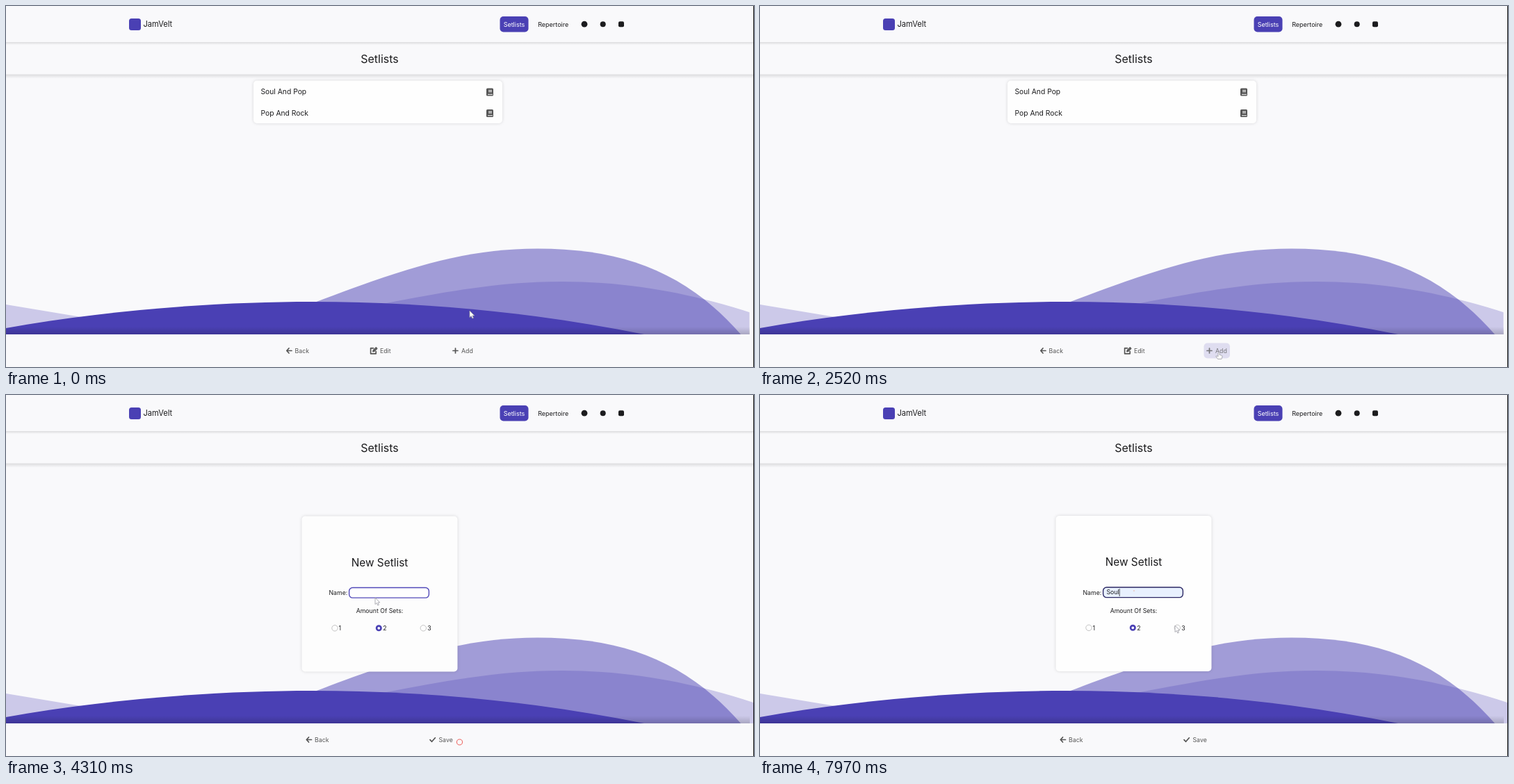
An HTML page that plays this animation: 1076x520 px, repeating every 8000 ms.

```html
<!DOCTYPE html>
<html lang="en">
<head>
<meta charset="utf-8">
<title>Setlists</title>
<style>
  html, body { margin: 0; width: 100%; height: 100%; overflow: hidden; background: #f9f9fb; }
  svg { display: block; width: 1076px; height: 520px; font: 9px Inter, sans-serif; fill: #1c1c1e; }
  .brand { fill: #4a40b4; }
  .bar { fill: #f9f9fb; }
  .panel { fill: #fefefe; filter: drop-shadow(0 0 2px rgba(0, 0, 0, .14)); }
  .list { font-size: 10.3px; }
  .small { font-size: 8.75px; }
  .mid { text-anchor: middle; }
  .tools { fill: #555; font-size: 8.75px; }
  .line { fill: none; stroke: #555; stroke-width: 1.7; stroke-linecap: round; stroke-linejoin: round; }
  .pointer { fill: #fff; stroke: #9a9aa2; stroke-width: .8; stroke-linejoin: round; }
</style>
</head>
<body>
<svg viewBox="0 0 1076 520">
  <defs>
    <linearGradient id="down" x2="0" y2="1">
      <stop stop-opacity=".12"/><stop offset="1" stop-opacity="0"/>
    </linearGradient>
    <linearGradient id="up" x2="0" y2="1">
      <stop stop-opacity="0"/><stop offset="1" stop-opacity=".17"/>
    </linearGradient>
    <g id="book">
      <rect width="10" height="11" rx="1.5" fill="#555"/>
      <path d="M3 3H8M3 5H8M2 8.8H9" stroke="#fefefe"/>
    </g>
    <g id="back">
      <path class="line" d="M407 493L403.8 496.5L407 500M404 496.5H411"/>
      <text x="415.5" y="496.5" dy=".36em">Back</text>
    </g>
  </defs>

  <g class="brand">
    <path d="M0 430L105 447.5C250 475 400 470 545 428.5C640 410 715 397 800 397C900 397 990 415 1075 443V473H0Z" opacity=".26"/>
    <path d="M400 444C560 382 650 349.5 765 349.5C890 349.5 980 385 1057 473H400Z" opacity=".5"/>
    <path d="M0 464C150 437 310 426 440 426C600 426 760 441 918 473H0Z"/>
  </g>

  <g id="listPage">
    <rect class="bar" x="1069.5" y="410" width="6" height="63"/>
    <rect class="panel" x="356" y="107.5" width="358" height="61.5" rx="5"/>
    <g class="list">
      <text x="366.5" y="123.5" dy=".36em">Soul And Pop</text>
      <text x="366.5" y="154" dy=".36em">Pop And Rock</text>
    </g>
    <use href="#book" x="691" y="118.5"/>
    <use href="#book" x="691" y="149"/>
  </g>

  <g id="form">
    <rect class="panel" x="425.5" y="174" width="224" height="224" rx="5"/>
    <text class="mid" x="537.5" y="240.5" dy=".36em" font-size="15.4">New Setlist</text>
    <g class="small">
      <text x="464.5" y="284.5" dy=".36em">Name:</text>
      <rect id="field" x="493.6" y="277" width="114.8" height="14.6" rx="5" stroke-width="1.4"/>
      <text id="typed" x="498.5" y="284.3" dy=".36em"></text>
      <path id="caret" d="M0 279V290" stroke="#222" stroke-width=".8"/>
      <text class="mid" x="537.5" y="310.5" dy=".36em">Amount Of Sets:</text>
      <g fill="#fff" stroke="#bbb" stroke-width=".9">
        <circle cx="473" cy="335.3" r="4.2"/>
        <circle cx="600.3" cy="335.3" r="4.2"/>
        <circle cx="536.3" cy="335.3" r="3.2" stroke="#4a40b4" stroke-width="2.7"/>
      </g>
      <text x="478.5" y="335.5" dy=".36em">1</text>
      <text x="542.2" y="335.5" dy=".36em">2</text>
      <text x="606.3" y="335.5" dy=".36em">3</text>
    </g>
  </g>

  <rect class="bar" width="1076" height="99"/>
  <rect y="52" width="1075" height="4" fill="url(#down)"/>
  <rect y="98.5" width="1075" height="6" fill="url(#down)"/>
  <rect class="brand" x="177" y="18" width="17" height="17" rx="3.5"/>
  <text x="197.5" y="26.3" dy=".36em" font-size="11.1">JamVelt</text>
  <rect class="brand" x="710.5" y="15" width="41" height="22.5" rx="5"/>
  <text class="mid" x="731" y="26.3" dy=".36em" fill="#fff">Setlists</text>
  <text class="mid" x="787.2" y="26.3" dy=".36em">Repertoire</text>
  <circle cx="832" cy="26.2" r="4.4"/>
  <circle cx="858.7" cy="26.2" r="4"/>
  <rect x="881" y="22.2" width="8" height="8" rx="2"/>
  <text class="mid" x="537.5" y="76" dy=".36em" font-size="16">Setlists</text>

  <rect y="462" width="1070" height="11" fill="url(#up)"/>
  <rect class="bar" y="473" width="1076" height="47"/>
  <g id="listTools" class="tools">
    <use href="#back"/>
    <path class="line" stroke-width="1.4" d="M528.5 492.8H524.6V500.8H532.2V497.5M528 497.8L528.5 495.8L532.3 492L533.6 493.3L529.8 497.2Z"/>
    <text x="538" y="496.5" dy=".36em">Edit</text>
    <rect id="hover" x="638.5" y="485.5" width="37.5" height="22" rx="5" fill="#dfddf0"/>
    <g id="add">
      <path class="line" d="M643 496.5H650M646.5 493V500"/>
      <text x="655" y="496.5" dy=".36em">Add</text>
    </g>
  </g>
  <g id="formTools" class="tools">
    <use href="#back" x="28.5"/>
    <path class="line" d="M610 496.7L612.6 499.3L617.4 493.8"/>
    <text x="622.5" y="496.5" dy=".36em">Save</text>
  </g>

  <path d="M1075.5 0V520" stroke="#111"/>
  <circle id="ring"/>
  <g id="cursor" class="pointer">
    <path id="arrow" d="M0 0V9.5L2.2 7.5L3.8 11L5.4 10.3L3.9 7H6.8Z"/>
    <path id="hand" d="M-1 0Q0-1 1 0V3.5L4 4.2Q5 4.5 5 6L4 9.5H-1.5L-4.2 5.5Q-3.5 4-1 6Z"/>
  </g>
</svg>
<script>
  const LOOP = 8000, OPEN = 3375, FOCUS = 5300;
  const ui = Object.fromEntries([...document.querySelectorAll('[id]')].map(el => [el.id, el]));
  const set = (el, attrs) => Object.entries(attrs).forEach(([key, value]) => el.setAttribute(key, value));
  const show = (el, on) => el.style.display = on ? '' : 'none';
  const clamp = v => Math.min(1, Math.max(0, v));

  // Pointer stops: time, x, y
  const stops = [
    [0, 667, 439], [100, 667, 439], [850, 660, 499], [2500, 660, 499], [3300, 654, 501],
    [3460, 654, 501], [3860, 489, 345], [4310, 531, 292], [4600, 538, 282],
    [7730, 545, 290], [7970, 597, 332], [8000, 598, 333]
  ];
  // Clicks: start of the ripple, x, y
  const ripples = [[3820, 652.5, 500], [5750, 538, 282]];
  const keyTimes = [6500, 6700, 6900, 7190];

  const bezier = (a, b, s) => 3 * a * s * (1 - s) ** 2 + 3 * b * s * s * (1 - s) + s ** 3;

  // The CSS "ease" curve
  function ease(x) {
    let lo = 0, hi = 1;
    for (let i = 0; i < 24; i++) {
      const s = (lo + hi) / 2;
      if (bezier(.25, .25, s) < x) lo = s; else hi = s;
    }
    return bezier(.1, 1, lo);
  }

  function pointerAt(t) {
    const i = stops.findIndex(stop => stop[0] > t);
    const [t0, x0, y0] = stops[i - 1], [t1, x1, y1] = stops[i];
    const k = (t - t0) / (t1 - t0), p = k * k * (3 - 2 * k);
    return [x0 + (x1 - x0) * p, y0 + (y1 - y0) * p];
  }

  function drawRipple(t) {
    const [start, x, y] = ripples[t < ripples[1][0] ? 0 : 1];
    const age = t - start, dot = age < 150, spent = age > 950;
    show(ui.ring, age >= 0 && (!spent || x === 538));
    set(ui.ring, {
      cx: x, cy: y,
      r: dot || spent ? 1.1 : 1.1 + (age - 150) / 117,
      fill: dot || spent ? '#f0703c' : 'none',
      stroke: dot || spent ? 'none' : '#ee5a55',
      opacity: spent ? .3 : clamp((950 - age) / 350)
    });
  }

  function draw(t) {
    const open = t >= OPEN, hovered = !open && t >= 650;
    show(ui.listPage, !open);
    show(ui.listTools, !open);
    show(ui.formTools, open);
    show(ui.form, open);
    show(ui.hover, hovered);
    set(ui.add, { opacity: hovered ? .75 : 1 });

    const p = ease(clamp((t - OPEN) / 1000));
    set(ui.form, { opacity: p, transform: `translate(0 ${224 * (1 - p)})` });
    set(ui.field, { fill: t > 7560 ? '#e8f0fe' : '#fff', stroke: t < FOCUS ? '#5048b8' : '#2b2763' });

    const count = keyTimes.filter(k => t >= k).length;
    ui.typed.textContent = 'Soul'.slice(0, count);
    const width = count ? ui.typed.getComputedTextLength() : 0;
    set(ui.caret, { transform: `translate(${499 + width} 0)` });
    show(ui.caret, t >= FOCUS && (count ? true : (t - FOCUS) % 900 < 450));

    const [x, y] = pointerAt(t);
    set(ui.cursor, { transform: `translate(${x} ${y})` });
    show(ui.cursor, t < 4600 || t >= 7730);
    show(ui.hand, hovered);
    show(ui.arrow, !hovered);
    drawRipple(t);
  }

  function tick() {
    draw(performance.now() % LOOP);
    requestAnimationFrame(tick);
  }
  tick();
</script>
</body>
</html>
```
